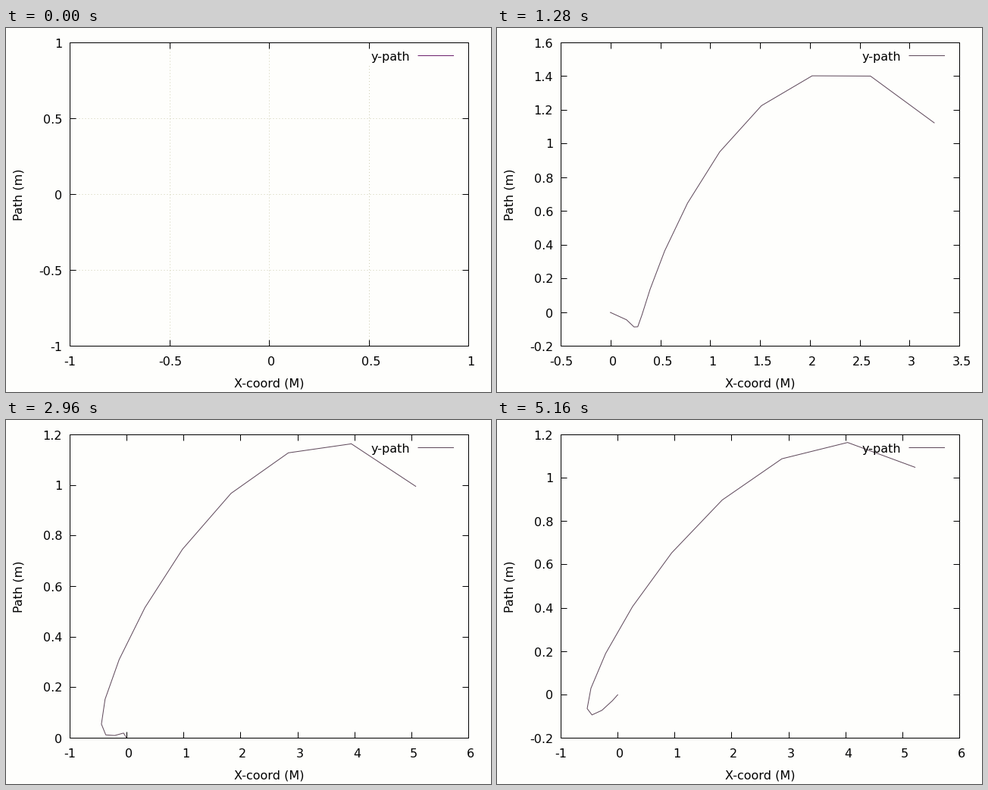
Recreate the animation shown at these times as a matplotlib script. Size 640 by 480 pixels, loop 5.2 s.

```python
import numpy as np
import matplotlib.pyplot as plt
from matplotlib.animation import FuncAnimation
from matplotlib.collections import LineCollection

W, H, DPI = 640, 480, 80
PX = 72 / DPI
FRAMES, INTERVAL = 130, 40
LEFT, RIGHT, TOP, BOTTOM = 84.5, 610.5, 19.5, 419.5
PAPER, INK, PATH, GRID = "#fefefc", "black", "#5e485a", "#cfcfb4"
KEY_EMPTY = "#6b1f6b"

plt.rcParams["font.family"] = "DejaVu Sans"
plt.rcParams["font.size"] = 16 * PX

# Each path is a quartic through its start and four key points.
SEGMENTS = 12
K = np.arange(SEGMENTS + 1)
NODES = [0, 3, 6, 10, 12]
START = (-.005, 0)


def path(*points):
    coords = np.array([START, *points]).T
    return np.array([np.polyval(np.polyfit(NODES, c, 4), K) for c in coords])


RISING = path((.09, 0), (.885, .253), (3.15, .507), (4.91, .913))
ARCHED = path((.27, -.085), (.54, .365), (2.02, 1.404), (3.245, 1.125))
TURNED = path((-.1, -.08), (.12, .265), (2.69, 1.427), (4.6, 1.256))
SETTLED = path((-.46, -.093), (-.22, .19), (2.88, 1.086), (5.222, 1.048))


def mix(a, b, t):
    return a + (b - a) * t


def pose(n):
    """Grow, bend over, then converge with a slow ripple in y."""
    if n <= 20:
        return RISING * n / 20
    if n <= 32:
        return mix(RISING, ARCHED, (n - 20) / 12)
    if n <= 50:
        return mix(ARCHED, TURNED, (n - 32) / 18)
    x, y = mix(SETTLED, TURNED, np.exp((50 - n) / 17))
    t = (n - 50) / (FRAMES - 1 - 50)
    return x, y + .12 * np.sin(np.pi * np.sqrt(t)) * np.sin(np.pi * K / 9)


def tic_step(span):
    """Tic spacing by the usual gnuplot rule."""
    power = 10.0 ** np.floor(np.log10(span))
    slots = 20 * power / span
    for limit, step in ((40, .05), (20, .1), (10, .2), (4, .5), (1, 1)):
        if slots > limit:
            return step * power
    return 2 * power


def tics(values):
    lo, hi = values.min(), values.max()
    step = tic_step(hi - lo)
    first = np.floor(lo / step + 1e-9)
    last = np.ceil(hi / step - 1e-9)
    return np.arange(first, last + 1) * step


def to_px(v, marks, a, b):
    return a + (v - marks[0]) / (marks[-1] - marks[0]) * (b - a)


fig = plt.figure(figsize=(W / DPI, H / DPI), dpi=DPI, facecolor=PAPER)
ax = fig.add_axes([0, 0, 1, 1])
ax.set(xlim=(0, W), ylim=(H, 0))
ax.axis("off")


def line(xs, ys, **style):
    return ax.plot(xs, ys, lw=PX, snap=False, **style)[0]


def segments(color, **style):
    lines = LineCollection([], colors=color, linewidths=PX, **style)
    lines.set_snap(False)
    return ax.add_collection(lines)


line([LEFT, RIGHT, RIGHT, LEFT, LEFT], [TOP, TOP, BOTTOM, BOTTOM, TOP],
     color=INK, zorder=3, solid_joinstyle="miter")
ax.text(347.5, 473, "X-coord (M)", ha="center", va="baseline")
ax.text(22, 220, "Path (m)", rotation=90, rotation_mode="anchor",
        ha="center", va="baseline")
ax.text(533, 43, "y-path", ha="right", va="baseline", zorder=4)
key = line([543.5, 591], [36.5, 36.5], solid_capstyle="butt")
curve = line([], [], color=PATH, zorder=2)
ticks = segments(INK, zorder=3)
grid = segments(GRID, zorder=1, linestyles=[(0, (1, 3))])
labels = []


def label(x, y, value, ha):
    text = f"{round(value, 9) + 0:g}"
    labels.append(ax.text(x, y, text, ha=ha, va="baseline"))


def draw(n):
    while labels:
        labels.pop().remove()
    if n == 0:
        xt = yt = np.linspace(-1, 1, 5)
        curve.set_data([], [])
    else:
        x, y = pose(n)
        xt, yt = tics(x), tics(y)
        curve.set_data(to_px(x, xt, LEFT, RIGHT), to_px(y, yt, BOTTOM, TOP))
    key.set_color(PATH if n else KEY_EMPTY)

    xp = np.floor(to_px(xt, xt, LEFT, RIGHT)) + .5
    yp = np.floor(to_px(yt, yt, BOTTOM, TOP)) + .5
    marks = []
    for p, v in zip(xp, xt):
        marks += [[(p, TOP), (p, TOP + 8)], [(p, BOTTOM - 8), (p, BOTTOM)]]
        label(p + (2.5 if v > -1e-9 else 0), 445, v, "center")
    for p, v in zip(yp, yt):
        marks += [[(LEFT, p), (LEFT + 8, p)], [(RIGHT - 8, p), (RIGHT, p)]]
        label(74, p + 6, v, "right")
    ticks.set_segments(marks)

    # The empty plot alone shows a grid, broken at the key.
    lines = []
    if n == 0:
        lines = [[(p, 50 if p > 470 else TOP + 8), (p, BOTTOM - 8)] for p in xp[1:-1]]
        lines += [[(LEFT + 8, p), (RIGHT - 8, p)] for p in yp[1:-1]]
    grid.set_segments(lines)
    return [curve, key, ticks, grid, *labels]


anim = FuncAnimation(fig, draw, frames=FRAMES, interval=INTERVAL,
                     init_func=lambda: draw(0), repeat=True, repeat_delay=0)
plt.show()
```
